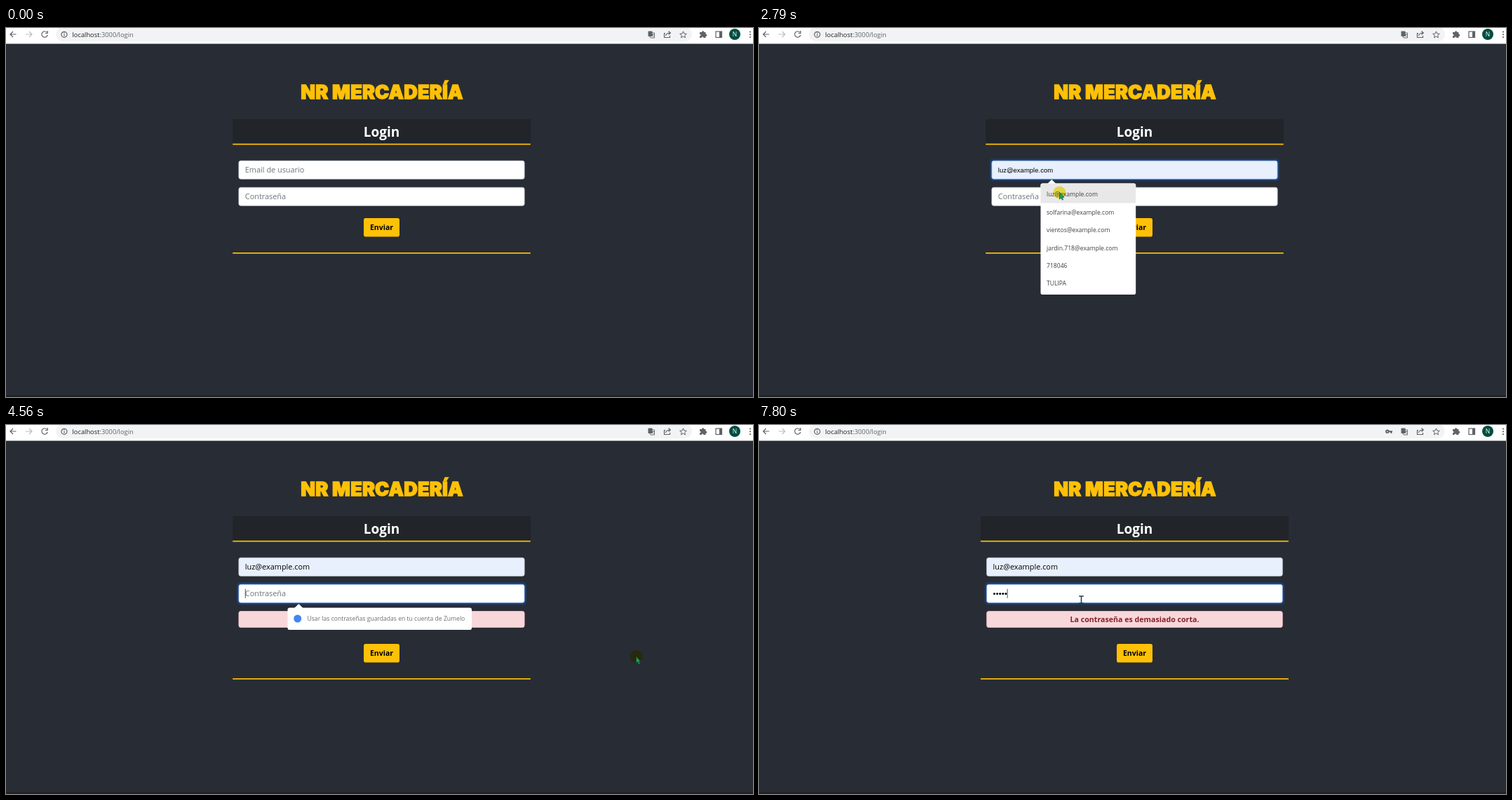
Write an HTML page that moves like this. It is 1065 px wide and 526 px high and loops after 8 s.

```html
<!DOCTYPE html>
<html lang="es">
<head>
<meta charset="utf-8">
<title>Login</title>
<style>
  html, body { margin: 0; width: 100%; height: 100%; overflow: hidden; background: #282c34; }
  svg { display: block; font-family: "Open Sans", "Noto Sans", sans-serif; }
  .brand { font: 900 27px Inter, Roboto, sans-serif; letter-spacing: .2px; fill: #ffc107; stroke: #ffc107; stroke-width: 1.3; }
  .mid { text-anchor: middle; font-weight: 700; }
  .field { font-size: 10.9px; font-weight: 500; }
  .hint { fill: #6c757d; }
  .menu { font-size: 8.6px; fill: #3c4043; }
  .icon { fill: none; stroke: #5f6368; stroke-width: 1.2; }
</style>
</head>
<body>
<svg id="stage" width="1065" height="526" viewBox="0 0 1065 526">
  <rect width="1065" height="526" fill="#282c34"/>
  <rect y="523.5" width="1065" height="2.5" fill="#1f2226"/>

  <g id="toolbar">
    <rect width="1065" height="22.5" fill="#fff"/>
    <rect x="71" y="-1" width="907" height="20" rx="10" fill="#f1f3f4"/>
    <g class="icon">
      <path d="M14.500 9H6M10 5L6 9L10 13"/>
      <path d="M28 9H36.500M33 5L37 9L33 13" stroke="#babcbe"/>
      <path d="M58.300 6.200A4.200 4.200 0 1 0 59.200 10M59.300 4V7.500H55.800"/>
      <circle cx="83" cy="9.300" r="4"/>
      <path d="M83 8.800V11.500M83 6.600V7.700"/>
      <path d="M940 7.500H938.500V13.500H946.500V11M940.500 11C941 8 943 7 947 7M944.500 4.500L947.300 7L944.500 9.500"/>
      <path d="M965.500 4.800L966.900 8L970.300 8.300L967.700 10.500L968.500 13.800L965.500 12L962.500 13.800L963.300 10.500L960.700 8.300L964.100 8Z" stroke-width="1"/>
      <rect x="1012" y="5" width="8.500" height="8.500"/>
      <path d="M918.500 7H924.500V14H919L918 12M920 9.500H924M922 8.500V9.500L920 12M921 10L923.500 12.500" stroke-width=".9"/>
    </g>
    <g fill="#5f6368">
      <rect x="915.500" y="4.500" width="6" height="7.500" rx=".8"/>
      <rect x="1017" y="5" width="3.500" height="8.500"/>
      <path d="M989 6H992A1.700 1.700 0 0 1 995.400 6H997.500V8.500A1.700 1.700 0 0 1 997.500 12V14H994.500A1.500 1.500 0 0 0 991.500 14H989V11.500A1.500 1.500 0 0 0 989 8.500Z"/>
      <circle cx="1061" cy="5.500" r="1.100"/><circle cx="1061" cy="9.300" r="1.100"/><circle cx="1061" cy="13.100" r="1.100"/>
    </g>
    <g id="key" fill="none" stroke="#5f6368" stroke-width="1.900">
      <circle cx="895.800" cy="9.300" r="1.800"/>
      <path d="M897.600 9.300H903M901.300 9.300V12"/>
    </g>
    <circle cx="1039" cy="9" r="8" fill="#004d40"/>
    <text x="1039" y="12" text-anchor="middle" font-size="8.500" fill="#fff">N</text>
    <text x="94.500" y="12.700" font-size="9.300" fill="#202124">localhost<tspan fill="#5f6368">:3000/login</tspan></text>
  </g>

  <text class="brand" x="536" y="100.500" text-anchor="middle">NR MERCADERÍA</text>

  <g id="form">
    <rect id="header" y="130" height="35" fill="#212529"/>
    <rect id="headerLine" y="164.800" height="1.700" fill="#ffc107"/>
    <text class="mid" x="535.500" y="154.600" font-size="19" fill="#fff">Login</text>
    <rect id="emailRing" y="186.300" height="32" rx="5" fill="#0d6efd" fill-opacity=".25"/>
    <rect id="email" y="189.300" height="26" rx="2.800" stroke-width=".8"/>
    <text id="emailHint" class="field hint" y="206">Email de usuario</text>
    <text id="emailDraft" y="206" font-family="Liberation Sans, Arial, sans-serif" font-size="9.500">luz@example.com</text>
    <text id="emailValue" class="field" y="206">luz@example.com</text>
    <rect id="passRing" y="224.300" height="32" rx="5" fill="#0d6efd" fill-opacity=".25"/>
    <rect id="pass" y="227.300" height="26" rx="2.800" fill="#fff" stroke-width=".8"/>
    <text id="passHint" class="field hint" y="244.300">Contraseña</text>
    <g id="dots"></g>
    <rect id="caret" width=".8" height="13" fill="#222"/>
    <g id="alert">
      <rect id="alertBox" y="265.500" height="23" rx="2.800" fill="#f8d7da" stroke="#f5c2c7" stroke-width=".8"/>
      <text id="alertText" class="mid" x="535.500" y="281" font-size="10.650" fill="#842029"></text>
    </g>
    <g id="footer">
      <rect x="510" y="271" width="51" height="26.500" rx="2.800" fill="#ffc107"/>
      <text class="mid" x="535.500" y="288" font-size="10.500">Enviar</text>
      <rect id="footerLine" y="320" height="1.700" fill="#ffc107"/>
    </g>
  </g>

  <g id="menu" class="menu">
    <path d="M411 222L417.300 216L423.500 222Z" fill="#fff"/>
    <rect x="401.500" y="221.500" width="135.700" height="158.500" rx="2.800" fill="#fff"/>
    <path id="menuHover" d="M401.500 249.500V224.300Q401.500 221.500 404.300 221.500H534.400Q537.200 221.500 537.200 224.300V249.500Z" fill="#e8e8e9"/>
  </g>

  <g id="prompt" class="menu">
    <path d="M411 261L417.300 255L423.500 261Z" fill="#fff"/>
    <rect x="401.500" y="260.500" width="262.500" height="31.500" rx="2.800" fill="#fff"/>
    <circle cx="415.700" cy="276" r="5.500" fill="#4285f4"/>
    <text x="429.500" y="279.200" fill="#6b6f74">Usar las contraseñas guardadas en tu cuenta de Zumelo</text>
  </g>

  <g id="pointer">
    <path id="arrow" d="M0 0V9.500L2.200 7.600L3.800 10.800L5.200 10.100L3.700 7H6.300Z" fill="#22b4dc" stroke="#17465e" stroke-width=".7"/>
    <path id="beam" d="M-3.300 -5H-.8L0 -4.400L.8 -5H3.300M0 -4.400V4.400M-3.300 5H-.8L0 4.400L.8 5H3.300" fill="none" stroke="#1d3d56" stroke-width="1.500"/>
    <circle id="glow" r="9" fill="#f7ec4c" style="mix-blend-mode:multiply"/>
  </g>
</svg>
<script>
const LOOP = 8000;
const T = {
  appear: 190, emailFocus: 1840, menuOpen: 1990, menuHover: 2290, pick: 2920,
  passFocus: 3270, blur: 4630, refocus: 5660, promptAgain: 5820, firstKey: 6070
};
const KEYS = [T.firstKey, 6480, 6940, 7400, 7800];
const CLICKS = [[1690, 1910], [2720, 2920], [3200, 3330], [4560, 4700], [5590, 5740]];
const BEAMS = [[1620, 2140], [3060, 4120], [5440, LOOP]];
const PATH = [
  [190, 508, 492], [560, 548, 395], [800, 562, 300], [940, 560, 260],
  [1400, 450, 215], [1690, 394, 200], [2000, 394, 200], [2450, 428.5, 234.5],
  [2950, 428.5, 234.5], [3200, 379, 241], [4010, 379, 241], [4300, 600, 285],
  [4540, 895, 335], [4630, 910, 314], [4770, 878, 322], [5080, 770, 285],
  [5380, 617.5, 248.5], [5490, 515, 240], [5590, 459.5, 249]
];

const ui = {};
document.querySelectorAll('#stage [id]').forEach(node => ui[node.id] = node);

const set = (node, attrs) => {
  for (const name in attrs) node.setAttribute(name, attrs[name]);
};
const add = (parent, tag, attrs, text = '') => {
  const node = document.createElementNS('http://www.w3.org/2000/svg', tag);
  set(node, attrs);
  node.textContent = text;
  return parent.appendChild(node);
};
const show = (node, visible) => { node.style.display = visible ? '' : 'none'; };
const clamp = v => Math.max(0, Math.min(1, v));
const ramp = (t, from, length) => clamp((t - from) / length);
const within = (t, spans) => spans.some(([from, to]) => t >= from && t < to);

['luz@example.com', 'solfarina@example.com', 'vientos@example.com',
 'jardin.718@example.com', '718046', 'TULIPA'].forEach((label, i) =>
  add(ui.menu, 'text', { x: 410, y: 240.3 + 25.4 * i }, label));
const dots = KEYS.map(() => add(ui.dots, 'circle', { cy: 240.5, r: 1.5 }));

function pointAt(t) {
  const next = PATH.findIndex(p => p[0] > t);
  if (next < 0) return PATH[PATH.length - 1].slice(1);
  if (next === 0) return PATH[0].slice(1);
  const [t0, x0, y0] = PATH[next - 1], [t1, x1, y1] = PATH[next];
  const k = (t - t0) / (t1 - t0);
  return [x0 + (x1 - x0) * k, y0 + (y1 - y0) * k];
}

function span(node, left, inset = 0) {
  const x = left + inset;
  set(node, { x, width: 2 * (535.5 - x) });
}

function drawForm(t) {
  const typed = KEYS.filter(k => t >= k).length;
  const left = typed ? 316 : 323.2;
  const textX = left + 17.6;
  const picked = t >= T.pick;
  const preview = t >= T.menuHover && !picked;

  [ui.header, ui.headerLine, ui.footerLine].forEach(n => span(n, left));
  [ui.email, ui.pass, ui.alertBox].forEach(n => span(n, left, 8.7));
  [ui.emailRing, ui.passRing].forEach(n => span(n, left, 5.7));
  [ui.emailHint, ui.emailDraft, ui.emailValue, ui.passHint].forEach(n => set(n, { x: textX }));

  const emailFocus = ramp(t, T.emailFocus, 150) - ramp(t, T.passFocus - 70, 150);
  const passFocus = ramp(t, T.passFocus, 150) - ramp(t, T.blur, 150) + ramp(t, T.refocus, 150);
  set(ui.emailRing, { opacity: emailFocus });
  set(ui.passRing, { opacity: passFocus });
  set(ui.email, { fill: preview || picked ? '#e8f0fe' : '#fff', stroke: emailFocus > .5 ? '#86b7fe' : '#ced4da' });
  set(ui.pass, { stroke: passFocus > .5 ? '#86b7fe' : '#ced4da' });

  show(ui.emailHint, !preview && !picked);
  show(ui.emailDraft, preview);
  show(ui.emailValue, picked);
  show(ui.passHint, !typed);
  dots.forEach((dot, i) => {
    set(dot, { cx: textX + 1.9 + 4.1 * i });
    show(dot, i < typed);
  });

  const inEmail = t >= T.emailFocus && t < T.menuHover;
  const inPass = within(t, [[T.passFocus, 3810], [4310, T.blur], [T.refocus, LOOP]]);
  set(ui.caret, { x: textX + (typed ? 4.1 * typed - .4 : 0), y: inEmail ? 195.5 : 233.7 });
  show(ui.caret, inEmail || inPass);

  show(ui.alert, picked);
  ui.alertText.textContent = typed ? 'La contraseña es demasiado corta.' : 'Este campo es obligatorio.';
  set(ui.footer, { transform: `translate(0 ${picked ? 41 : 0})` });
  show(ui.key, typed > 0);
}

function drawPopups(t) {
  show(ui.menu, t >= T.menuOpen && t < T.pick);
  show(ui.menuHover, t >= T.menuHover);

  const again = t >= T.promptAgain;
  const shown = again ? ramp(t, T.promptAgain, 80) : ramp(t, T.passFocus + 70, 80);
  const gone = again ? ramp(t, T.firstKey, 175) : ramp(t, T.blur, 140);
  const scale = 1 - .045 * gone;
  set(ui.prompt, {
    opacity: shown * (1 - gone),
    transform: `translate(532.8 276) scale(${scale}) translate(-532.8 -276)`
  });
}

function drawPointer(t) {
  const [x, y] = pointAt(t);
  const beam = within(t, BEAMS);
  set(ui.pointer, { transform: `translate(${x} ${y})` });
  show(ui.pointer, t >= T.appear);
  show(ui.beam, beam);
  show(ui.arrow, !beam);
  show(ui.glow, within(t, CLICKS));
}

function render(t) {
  drawForm(t);
  drawPopups(t);
  drawPointer(t);
}

const start = performance.now();
function tick() {
  render((performance.now() - start) % LOOP);
  requestAnimationFrame(tick);
}
render(0);
requestAnimationFrame(tick);
</script>
</body>
</html>
```
